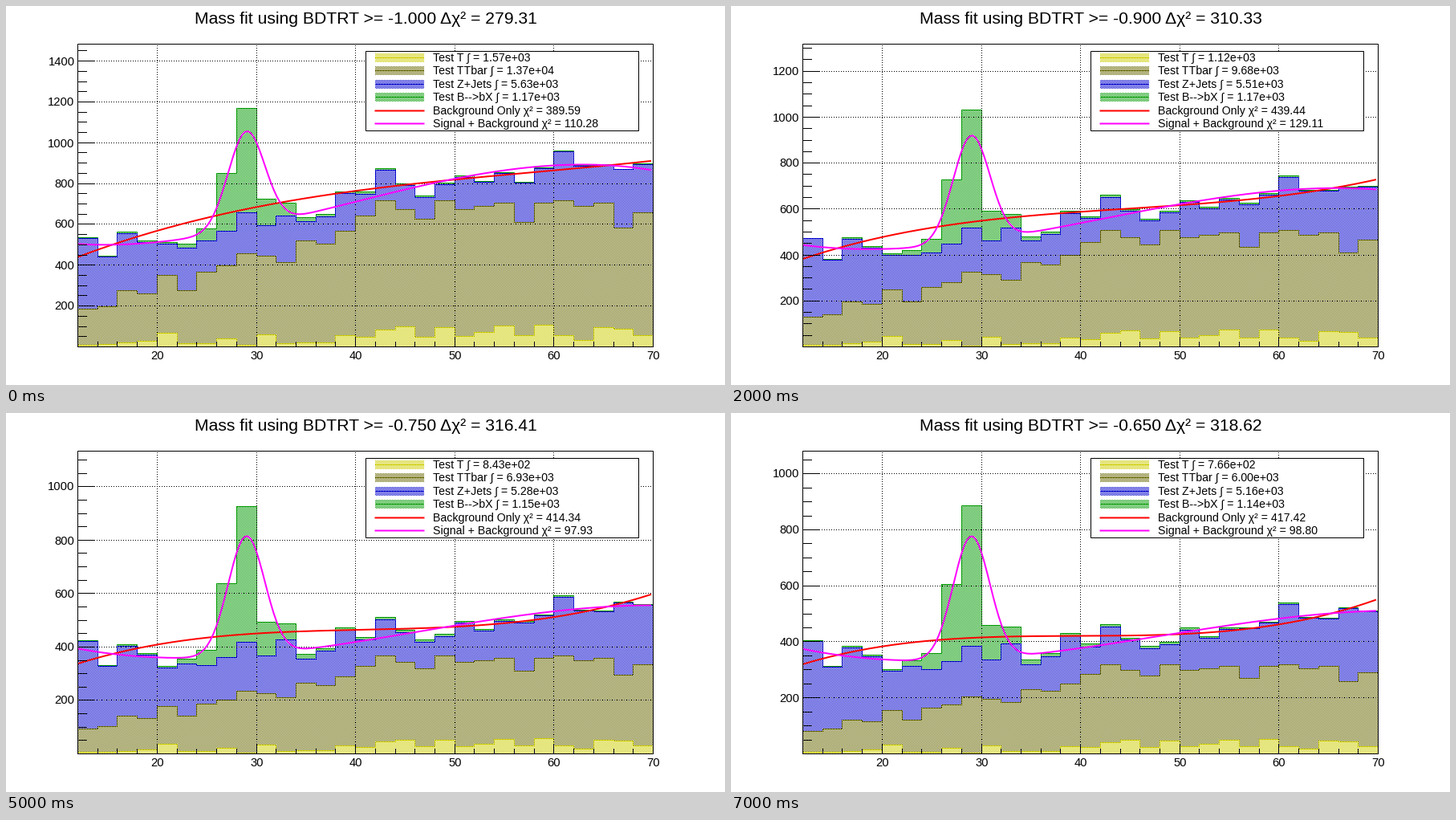
Animation of 896x472 px, one loop 8000 ms. Source, as a matplotlib script:

```python
import numpy as np
import matplotlib.pyplot as plt
from matplotlib.animation import FuncAnimation
from matplotlib.patches import Rectangle

W, H, DPI = 896, 472, 100
LEFT, RIGHT, TOP, BOTTOM = 89, 806, 47, 424
X_MIN, X_MAX, N_BINS = 12, 70, 29
PX = 72 / DPI

GREEN, BLUE, OLIVE, YELLOW = (0, 153, 0), (0, 0, 204), (102, 102, 0), (204, 204, 0)
RED, MAGENTA = (255, 0, 0), (255, 0, 255)

plt.rcParams["font.family"] = "Liberation Sans"

# Sample yields, fit qualities and axis top at some cut steps.
KEY_STEPS = [0, 1, 2, 4, 6, 7]
KEYS = {
    "T": [1570, 1370, 1120, 890, 796, 766],
    "TTbar": [13700, 11800, 9680, 7410, 6450, 6000],
    "Z+Jets": [5630, 5590, 5510, 5340, 5230, 5160],
    "B-->bX": [1170, 1170, 1170, 1160, 1140, 1140],
    "bkg": [389.59, 424.65, 439.44, 414.17, 414.50, 417.42],
    "sig": [110.28, 123.01, 129.11, 97.32, 98.54, 98.80],
    "top": [1483, 1400.5, 1318, 1169, 1097, 1081],
}
SAMPLES = [("T", YELLOW), ("TTbar", OLIVE), ("Z+Jets", BLUE), ("B-->bX", GREEN)]

# Bin shapes in thousandths of the yield; every cut only rescales them.
T_SHAPE = np.array([6, 7, 12, 18, 42, 9, 9, 26, 4, 38, 10, 13, 13, 34, 29,
                    52, 62, 31, 60, 33, 44, 65, 35, 67, 34, 21, 60, 56, 35])
TOP_SHAPE = np.array([12, 13, 18, 17, 23, 18, 24, 26, 30, 29, 27, 34, 33, 37, 42,
                      47, 44, 41, 47, 44, 45, 46, 40, 46, 47, 45, 46, 38, 43])
Z_SHAPE = np.array([62, 43, 50, 45, 27, 37, 27, 30, 35, 27, 41, 17, 24, 33, 19,
                    26, 21, 19, 14, 28, 21, 26, 34, 30, 42, 35, 33, 51, 42])
B_SHAPE = np.interp(np.arange(N_BINS), [0, 4, 5, 6, 7, 8, 9, 10, 11, 12, 28],
                    [2, 6, 17, 51, 241, 440, 109, 52, 15, 9, 2])

EDGES = np.round(np.linspace(LEFT, RIGHT, N_BINS + 1)).astype(int)
CENTRES = X_MIN + 2 * np.arange(N_BINS) + 1
ROWS, COLS = np.indices((H, W))
CHECKER = (ROWS + COLS) % 2 == 1


def rgb(color):
    return tuple(c / 255 for c in color)


def to_x(x):
    return LEFT + (x - X_MIN) * (RIGHT - LEFT) / (X_MAX - X_MIN)


def stack(now):
    """Heights of the stacked layers, highest first."""
    t = T_SHAPE * now["T"] / 1000
    tops = TOP_SHAPE * (now["T"] + now["TTbar"]) / 1000
    bkg = tops + Z_SHAPE * now["Z+Jets"] / 1000
    return [bkg + B_SHAPE * now["B-->bX"] / 1000, bkg, tops, t]


def basis(x, peak):
    u = (x - 41) / 29
    cols = [np.ones_like(u), u, u**2, u**3]
    if peak:
        cols.append(np.exp(-0.5 * ((x - 29) / 1.85) ** 2))
    return np.stack(cols, axis=1)


def fit(x, counts, peak):
    """Least chi-square fit of a cubic, with or without a peak."""
    weight = 1 / np.sqrt(counts)
    terms = basis(CENTRES, peak) * weight[:, None]
    coef = np.linalg.lstsq(terms, counts * weight, rcond=None)[0]
    return basis(x, peak) @ coef


def hatch(color):
    return np.where(CHECKER[..., None], color, 255)


fig = plt.figure(figsize=(W / DPI, H / DPI), dpi=DPI, facecolor="white")
ax = fig.add_axes([0, 0, 1, 1])


def line(xs, ys, color=(0, 0, 0), width=1, z=3, cap="projecting", **kw):
    ax.plot(xs, ys, color=rgb(color), lw=width * PX, zorder=z, snap=False,
            solid_capstyle=cap, solid_joinstyle="miter",
            dash_capstyle="butt", **kw)


def label(x, y, text, size, **kw):
    ax.text(x, y, text, fontsize=size * PX, va="baseline", zorder=9, **kw)


def box(x, y, w, h, z, **kw):
    ax.add_patch(Rectangle((x, y), w, h, lw=PX, ec="black", zorder=z,
                           snap=False, **kw))


def picture(pixels, z, extent=None):
    ax.imshow(pixels.astype(np.uint8), zorder=z, extent=extent,
              interpolation="nearest", aspect="auto")


def histograms(tops):
    canvas = np.full((H, W, 3), 255)
    bars = (ROWS <= BOTTOM) & (COLS >= LEFT) & (COLS < RIGHT)
    bin_of = np.clip(np.searchsorted(EDGES, np.arange(W), "right") - 1,
                     0, N_BINS - 1)
    for i, (top, (_, color)) in enumerate(zip(tops, SAMPLES[::-1])):
        mask = bars & (ROWS >= top[bin_of])
        canvas[mask] = hatch(color)[mask]
        line(np.repeat(EDGES, 2)[1:-1], np.repeat(top, 2), color, z=3 + 0.1 * i)
    picture(canvas, 1)


def axes_and_grid(to_y, y_max):
    dots = dict(z=5, ls=(0, (1, 2)))
    for v in range(50, int(y_max) + 1, 50):
        y = np.round(to_y(v))
        major = v % 200 == 0
        line([LEFT, LEFT + (21 if major else 11)], [y, y], z=7)
        if major:
            line([LEFT - 0.5, RIGHT], [y, y], **dots)
            label(85, y + 5, str(v), 14.8, ha="right")
    for v in range(X_MIN, X_MAX + 1, 2):
        x = np.round(to_x(v))
        major = v % 10 == 0
        line([x, x], [BOTTOM, BOTTOM - (11 if major else 6)], z=7)
        if major:
            line([x, x], [BOTTOM + 0.5, TOP], **dots)
            label(x, 440, str(v), 14.8, ha="center")
    box(LEFT, TOP, RIGHT - LEFT, BOTTOM - TOP, 7, fill=False)


def legend(now):
    box(448, 56, 340, 99, 7.5, fc="white")
    entries = [(f"Test {name} ∫ = {now[name]:.2e}", color, 1)
               for name, color in SAMPLES]
    entries += [(f"Background Only χ² = {now['bkg']:.2f}", RED, 2),
                (f"Signal + Background χ² = {now['sig']:.2f}", MAGENTA, 2)]
    for i, (text, color, width) in enumerate(entries):
        y = int(round(63.5 + 16.6 * i))
        label(532, y + 4, text, 14.1)
        line([460, 520], [y, y], color, width, z=8.5)
        if width == 1:
            picture(hatch(color)[y - 5:y + 6, 460:521], 8,
                    (459.5, 520.5, y + 5.5, y - 5.5))


def draw(k):
    ax.cla()
    ax.axis("off")
    now = {name: np.interp(k, KEY_STEPS, vals) for name, vals in KEYS.items()}
    layers = stack(now)

    def to_y(v):
        return BOTTOM - v * (BOTTOM - TOP) / now["top"]

    histograms([np.round(to_y(v)) for v in layers])
    axes_and_grid(to_y, now["top"])
    x = np.linspace(X_MIN, 69.8, 200)
    for color, peak in [(RED, False), (MAGENTA, True)]:
        line(to_x(x), to_y(fit(x, layers[0], peak)), color, 2, z=6, cap="butt")

    legend(now)
    label(448, 22, f"Mass fit using BDTRT >= {-1 + 0.05 * k:.3f} "
          f"Δχ² = {now['bkg'] - now['sig']:.2f}", 21.1, ha="center")
    ax.set_xlim(-0.5, W - 0.5)
    ax.set_ylim(H - 0.5, -0.5)


anim = FuncAnimation(fig, draw, frames=8, interval=1000, repeat=True,
                     init_func=lambda: draw(0), blit=False)
plt.show()
```
